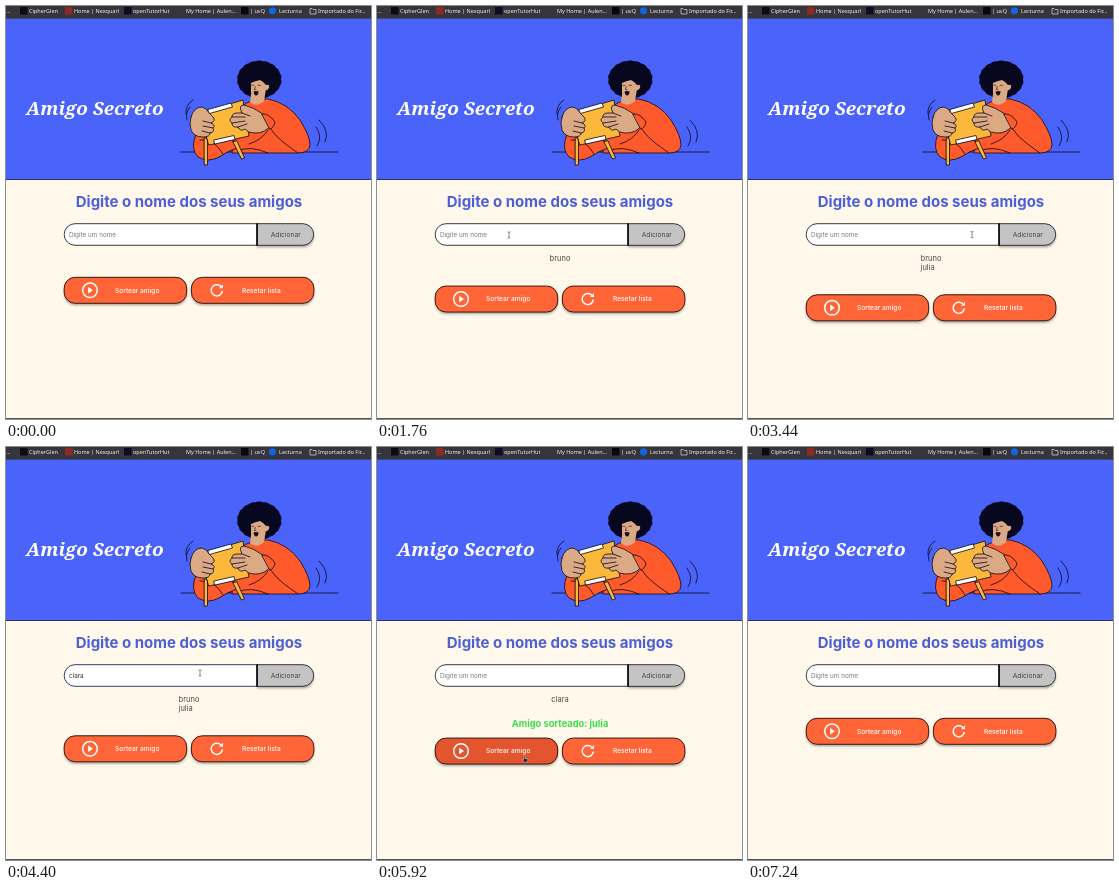
An HTML page with a canvas that plays this animation: 365 by 413 pixels, repeating every 8 s.

```html
<!DOCTYPE html>
<html lang="pt-BR">
<head>
<meta charset="utf-8">
<title>Amigo Secreto</title>
<style>
html, body { margin: 0; width: 100%; height: 100%; overflow: hidden; background: #fff8eb; }
canvas { display: block; width: 365px; height: 413px; }
</style>
</head>
<body>
<canvas id="stage" width="365" height="413"></canvas>
<script>
const ctx = document.getElementById('stage').getContext('2d');
const LOOP = 8000;
const INK = '#0b0b16', BORDER = '#25252b', ORANGE = '#ff6536', HOVER = '#e4552f';
const SKIN = '#dca985', COAT = '#ff5a2c', GOLD = '#fcb83b';
const UI = 'Inter, sans-serif', CHROME = '"Noto Sans", "Open Sans", sans-serif';
const LINE = 8.75;

// Cursor stops: time, x, y
const PATH = [
  [40, 366, 286], [480, 150, 229], [1280, 150, 229], [1460, 286, 234],
  [1560, 286, 234], [1760, 132, 229], [2560, 132, 229], [2840, 286, 234],
  [3120, 286, 234], [3640, 194, 226], [4400, 194, 226], [4600, 286, 234],
  [4760, 286, 234], [5130, 148, 312], [5960, 148, 312], [6400, 252, 42],
  [6520, 252, 42], [6680, 262, 305], [7110, 262, 305], [7230, 370, 286]
];

// Each entry: focus time, first key, key interval, submit time
const ENTRIES = [
  { name: 'bruno', focus: 480, start: 680, step: 90, submit: 1500 },
  { name: 'julia', focus: 2060, start: 2080, step: 90, submit: 3000 },
  { name: 'clara', focus: 3660, start: 3920, step: 60, submit: 4680 }
];
const DRAWS = [{ at: 5280, name: 'bruno' }, { at: 5600, name: 'julia' }];
const ALERT = { from: 5940, to: 6500 };
const RESET = 7100;

function cursorAt(t) {
  if (t < PATH[0][0] || t >= PATH[PATH.length - 1][0]) return null;
  const i = PATH.findIndex(p => p[0] > t);
  const [t0, x0, y0] = PATH[i - 1], [t1, x1, y1] = PATH[i];
  const u = (t - t0) / (t1 - t0), e = u * u * (3 - 2 * u);
  return { x: x0 + (x1 - x0) * e, y: y0 + (y1 - y0) * e };
}

function stateAt(t) {
  const drawn = t < RESET ? DRAWS.filter(d => t >= d.at).map(d => d.name) : [];
  const names = t < RESET
    ? ENTRIES.filter(e => t >= e.submit && !drawn.includes(e.name)).map(e => e.name) : [];
  const entry = ENTRIES.find(e => t >= e.focus && t < e.submit);
  const count = entry ? Math.max(0, Math.floor((t - entry.start) / entry.step) + 1) : 0;
  return {
    names, winner: drawn[drawn.length - 1],
    focused: !!entry,
    typed: entry ? entry.name.slice(0, count) : '',
    caret: !!entry && t < 4200,
    top: 271 + names.length * LINE + (drawn.length ? 11 : 0),
    alert: t >= ALERT.from && t < ALERT.to
  };
}

function text(str, x, y, font, color, align = 'left') {
  ctx.font = font;
  ctx.fillStyle = color;
  ctx.textAlign = align;
  ctx.fillText(str, x, y);
}

function paint(fill, stroke = INK, width = 0.8) {
  if (fill) { ctx.fillStyle = fill; ctx.fill(); }
  if (stroke) { ctx.strokeStyle = stroke; ctx.lineWidth = width; ctx.stroke(); }
}

function shape(d, fill, stroke, width) {
  const p = new Path2D(d);
  if (fill) { ctx.fillStyle = fill; ctx.fill(p); }
  if (stroke !== null) {
    ctx.strokeStyle = stroke || INK;
    ctx.lineWidth = width || 0.8;
    ctx.stroke(p);
  }
}

function box(x, y, w, h, radii, fill, stroke, width) {
  ctx.beginPath();
  ctx.roundRect(x, y, w, h, radii);
  paint(fill, stroke, width);
}

function disc(x, y, r, fill, stroke = null, width) {
  ctx.beginPath();
  ctx.arc(x, y, r, 0, Math.PI * 2);
  paint(fill, stroke, width);
}

function shadowed(draw, blur = 2.5, dy = 2, alpha = 0.35) {
  ctx.save();
  ctx.shadowColor = `rgba(0,0,0,${alpha})`;
  ctx.shadowBlur = blur;
  ctx.shadowOffsetY = dy;
  draw();
  ctx.restore();
}

function drawBookmarks() {
  ctx.fillStyle = '#36353b';
  ctx.fillRect(0, 0, 365, 12.6);
  const label = (s, x) => text(s, x, 7, '5.5px ' + CHROME, '#f0f0f3');
  label('...', 0);
  box(14, 1, 7.5, 7.5, 0, '#0a0c0e', null);
  label('CipherGlen', 23);
  box(59, 1, 7.5, 7.5, 0, '#8c2a24', null);
  label('Home | Nexquarl', 68);
  box(118, 1, 7.5, 7.5, 0, '#0c0c24', null);
  label('openTutorHut', 127);
  label('My Home | Aulen...', 180);
  box(235, 1, 7.5, 7.5, 0, '#08080a', null);
  label('| uvQ', 244);
  disc(266.5, 4.8, 3.6, '#1463e0');
  label('Lecturna', 273);
  shape('M304 2.5h2l1 1h3v4.5h-6z', null, '#d8d8dc', 0.7);
  label('Importado do Fir...', 312);
}

function drawHair() {
  ctx.beginPath();
  for (let i = 0; i <= 120; i++) {
    const a = i / 120 * Math.PI * 2, k = 1 + 0.035 * Math.abs(Math.sin(a * 9));
    ctx.lineTo(253.3 + 21.6 * k * Math.cos(a), 73.5 + 18.4 * k * Math.sin(a));
  }
  paint('#070720', null);
}

function drawPerson() {
  ctx.save();
  ctx.lineJoin = ctx.lineCap = 'round';
  shape('M175 146H332');
  shape('M187 94Q179 99 180 108M184 101Q179 107 181 114M310 121Q317 131 311 140M313 114Q324 125 319 136');
  // Torso, resting arm and knee
  shape('M236 100Q246 92 262 93Q282 97 294 114Q304 130 304 139Q303 147 292 147H226Q228 112 236 100Z', COAT);
  shape('M264 122Q270 131 277 136Q282 140 292 147M262 124Q256 134 243 138');
  shape('M190 128Q184 143 192 151Q202 157 213 151Q222 145 231 142L222 126Z', COAT);
  shape('M194 134Q208 132 217 148M232 145Q244 139 262 147');
  drawHair();
  // Neck and face
  shape('M245 88L244 96Q250 102 258 95L260 83Z', SKIN, null);
  shape('M245 77Q249 75 254 74Q258 76 260 79Q264 78 263 82Q261 85 259 84Q258 91 252 92Q246 92 245 87Z', SKIN, null);
  shape('M245.8 79.3h2M252 79.3h2.5M249.2 80.5l-.7 3h1.4', null, INK, 0.6);
  shape('M247.6 85.4Q250 84.4 252.6 85.6Q252.2 89.6 250 89.6Q248 89 247.6 85.4Z', '#160c14', null);
  // Straps and box
  shape('M198.5 132h3V159h-3ZM227 136L235.5 153L238.5 152L231 135Z', GOLD);
  shape('M194 107L237 94Q239 111 243 130L203 139Z', GOLD);
  shape('M202 103.5L225 97L226.5 101L203.5 107.5ZM208 134L228 129.5L229 133.5L209 138Z', '#fff');
  // Left hand
  shape('M185 111Q188 101 196 101Q201 102 203 107L207 111Q210 115 205 117Q210 119 207 122Q209 126 204 127Q204 131 197 131Q188 131 185 124Q183 117 185 111Z', SKIN);
  shape('M205 117L197 115M207 122L197 120M204 127L196 125');
  // Right hand
  shape('M266 118Q259 128 248 127Q242 127 239 123Q234 126 232 121Q226 122 226 117Q222 114 226 111Q226 107 231 107L236 107Q232 99 238 99Q247 101 257 108Z', SKIN);
  shape('M226 111L239 111M226 117L239 115M232 121L241 118M236 107L244 110');
  shape('M256 108Q263 107 269 116Q268 122 264 123Z', COAT);
  ctx.restore();
}

function drawBanner() {
  ctx.fillStyle = '#4a63fb';
  ctx.fillRect(0, 12, 365, 161);
  ctx.fillStyle = '#2c3464';
  ctx.fillRect(0, 173, 365, 1);
  text('Amigo Secreto', 20, 108.5, 'italic bold 18.9px Merriweather, "Noto Serif", serif', '#fff');
  drawPerson();
}

function drawForm(state, hover) {
  text('Digite o nome dos seus amigos', 183, 201, 'bold 15px ' + UI, '#4b5fd9', 'center');
  const addFill = hover === 'add' ? '#a1a1a1' : '#c4c4c4';
  shadowed(() => box(251, 217.7, 56.7, 21.6, [0, 11, 11, 0], addFill, null));
  box(251, 217.7, 56.7, 21.6, [0, 11, 11, 0], addFill, BORDER, 0.9);
  box(58.2, 217.7, 192.8, 21.6, [11, 0, 0, 11], '#fff', state.focused ? '#1c2a58' : BORDER, 0.9);
  ctx.fillStyle = INK;
  ctx.fillRect(250.2, 217.3, 1.6, 22.4);
  text('Adicionar', 279.7, 231, '6.7px ' + UI, '#444', 'center');
  const font = '6.35px ' + UI;
  text(state.typed || 'Digite um nome', 63, 230.7, font, state.typed ? '#333' : '#7a7a7a');
  if (state.caret) {
    ctx.font = font;
    ctx.fillStyle = '#222';
    ctx.fillRect(63.4 + ctx.measureText(state.typed).width, 224.8, 0.6, 7.4);
  }
}

function drawList({ names, winner, top }) {
  const font = '7.5px ' + UI;
  ctx.font = font;
  const width = Math.max(0, ...names.map(n => ctx.measureText(n).width));
  names.forEach((n, i) => text(n, 183 - width / 2, 255 + i * LINE, font, '#4a4a4a'));
  if (winner) {
    text('Amigo sorteado: ' + winner, 183, top - 10.5, 'bold 9.3px ' + UI, '#35e04a', 'center');
  }
}

function actionButton(x, top, label, labelX, hovered) {
  const fill = hovered ? HOVER : ORANGE;
  shadowed(() => box(x, top + 0.3, 122.5, 26, 11, fill, null));
  box(x, top + 0.3, 122.5, 26, 11, fill, '#2c1a14', 0.95);
  text(label, labelX, top + 15.7, '500 6.6px ' + UI, '#fff');
}

function drawActions(top, hover) {
  const y = top + 13.3;
  actionButton(58.2, top, 'Sortear amigo', 109, hover === 'draw');
  disc(84, y, 7.3, null, '#fff', 1.5);
  shape(`M82.2 ${y - 3.2}L87 ${y}L82.2 ${y + 3.2}Z`, '#fff', null);
  actionButton(185.4, top, 'Resetar lista', 236, hover === 'reset');
  ctx.beginPath();
  ctx.arc(210.8, y, 5.6, 0.1, Math.PI * 1.8);
  paint(null, '#fff', 1.5);
  shape(`M217 ${y - 6}V${y - 2}H213Z`, '#fff', null);
}

function drawAlert() {
  shadowed(() => box(89.5, -8, 187.5, 66.5, 6, '#f9fafd', null), 5, 1, 0.45);
  text('challenge-amigo-secreto-g8-one-six.vercel.app says', 98, 13, '6.95px ' + CHROME, '#26282c');
  text('Todos os nomes foram sorteados!', 98, 25.3, '5.5px ' + CHROME, '#55585e');
  box(240, 33.7, 29, 16.8, 8.4, '#d4edf5', '#27475a', 1.2);
  box(242, 35.6, 25, 13, 6.5, '#3a7186', '#27475a', 0.8);
  text('OK', 254.5, 44.6, '6.3px ' + CHROME, '#e8fbff', 'center');
}

function hoverAt(c, top) {
  if (!c) return '';
  const inside = (x, y, w, h) => c.x >= x && c.x <= x + w && c.y >= y && c.y <= y + h;
  if (inside(252, 218, 56, 21)) return 'add';
  if (inside(58, 218, 192, 21)) return 'input';
  if (inside(58, top, 123, 26.5)) return 'draw';
  if (inside(185, top, 123, 26.5)) return 'reset';
  return '';
}

function drawCursor({ x, y }, kind) {
  ctx.save();
  ctx.translate(x, y);
  ctx.lineJoin = 'round';
  if (kind === 'input') {
    shape('M-1.5 -3.2Q0 -3.2 0 -2.4Q0 -3.2 1.5 -3.2M0 -2.4V2.4M-1.5 3.2Q0 3.2 0 2.4Q0 3.2 1.5 3.2', null, '#555', 0.7);
  } else if (kind === 'hand') {
    shape('M-1.2 -2.5Q-.5 -3.3 .1 -2.5V-.6L2.4 -.1Q3 .2 2.8 1.2L2.2 3.2H-.8L-2.6 .8Q-2.6 0 -1.2 .5Z', '#222', '#ddd', 0.5);
  } else {
    shape('M0 0V6.2L1.5 4.9L2.5 7.1L3.5 6.6L2.6 4.5H4.5Z', '#111', '#fff', 0.6);
  }
  ctx.restore();
}

function render(t) {
  const state = stateAt(t), cursor = cursorAt(t);
  const hover = state.alert ? 'draw' : hoverAt(cursor, state.top);
  ctx.fillStyle = '#fff8eb';
  ctx.fillRect(0, 0, 365, 413);
  drawBanner();
  drawBookmarks();
  drawForm(state, hover);
  drawList(state);
  drawActions(state.top, hover);
  ctx.fillStyle = '#55534f';
  ctx.fillRect(0, 412, 365, 1);
  if (state.alert) drawAlert();
  if (cursor) {
    const overOk = state.alert && cursor.y < 50;
    const kind = state.alert ? (overOk ? 'hand' : 'arrow')
      : hover === 'input' ? 'input' : hover ? 'hand' : 'arrow';
    drawCursor(cursor, kind);
  }
}

const begin = performance.now();
function tick() {
  render((performance.now() - begin) % LOOP);
  requestAnimationFrame(tick);
}
tick();
</script>
</body>
</html>
```
